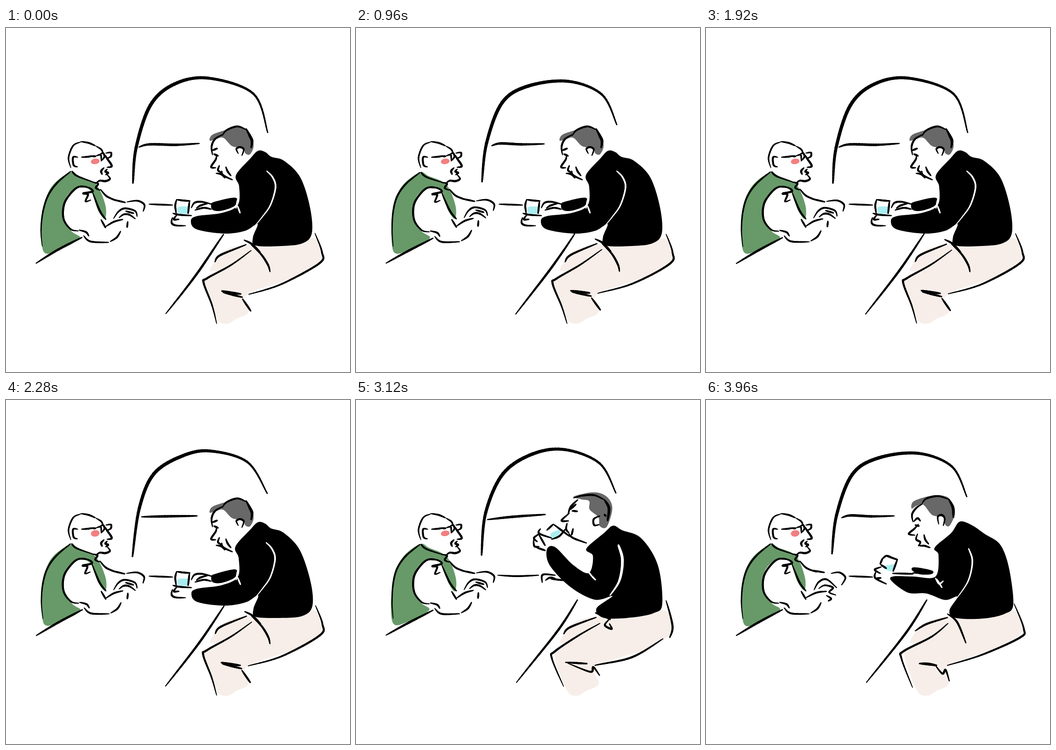
Recreate the animation shown at these times as an HTML page with a canvas. Size 748 by 748 pixels, loop 4080 ms.

```html
<!DOCTYPE html>
<html lang="en">
<head>
<meta charset="utf-8">
<title>Two men at a table</title>
<style>
html, body { margin: 0; width: 100%; height: 100%; overflow: hidden; background: #fff; }
canvas { display: block; width: 748px; height: 748px; }
</style>
</head>
<body>
<canvas id="stage" width="748" height="748"></canvas>
<script>
const ctx = document.getElementById('stage').getContext('2d');
const STEP = 120, COUNT = 34;
let boil = 0;

// Hand-drawn wobble: a slow wave over the stage, different for each redraw
function wobble(x, y) {
  const a = boil ? 1.3 : 0;
  return [x + a * Math.sin(y / 37 + boil * 2.3), y + a * Math.sin(x / 41 + boil * 4.1)];
}

function curve(text, closed) {
  const v = text.trim().split(' ').map(Number), n = v.length / 2, out = [];
  const at = (i, k) => v[2 * (closed ? (i + n) % n : Math.max(0, Math.min(n - 1, i))) + k];
  const mix = (i, t, k) => {
    const a = at(i - 1, k), b = at(i, k), c = at(i + 1, k), d = at(i + 2, k);
    return b + t / 2 * (c - a + t * (2 * a - 5 * b + 4 * c - d + t * (3 * (b - c) + d - a)));
  };
  for (let i = 0; i < (closed ? n : n - 1); i++)
    for (let t = 0; t < 1; t += 0.1) out.push(wobble(mix(i, t, 0), mix(i, t, 1)));
  if (!closed) out.push(wobble(at(n - 1, 0), at(n - 1, 1)));
  return out;
}

function fill(color, text) {
  ctx.fillStyle = color;
  ctx.beginPath();
  curve(text, true).forEach(p => ctx.lineTo(...p));
  ctx.fill();
}

// Tapered brush strokes; peak is where the stroke is fattest
function ink(width, list, color = '#000', peak = 0.5) {
  ctx.strokeStyle = color;
  ctx.lineCap = 'round';
  for (const text of list.split(';')) {
    const p = curve(text);
    for (let i = 1; i < p.length; i++) {
      const u = i / p.length, s = Math.sin(Math.PI * u ** (Math.log(0.5) / Math.log(peak)));
      ctx.lineWidth = width * (0.25 + 0.75 * s ** 0.7);
      ctx.beginPath();
      ctx.moveTo(...p[i - 1]);
      ctx.lineTo(...p[i]);
      ctx.stroke();
    }
  }
}

const arches = {
  A: '276 337 283 260 314 168 366 122 440 109 538 143 569 227',
  B: '274 334 284 250 318 162 375 126 462 116 535 145 567 210',
  C: '273 337 282 245 320 160 385 117 455 108 530 138 565 202',
  D: '275 340 290 235 322 160 385 121 445 111 525 135 568 203'
};
const sills = {
  A: '289 259 312 253 370 254 420 251',
  B: '295 256 314 251 360 253 409 252',
  C: '286 260 340 254 411 249',
  D: '295 254 345 253 415 252'
};

function room(arch, pose) {
  boil = 0;
  ink(7.5, arches[arch], '#000', 0.36);
  ink(5.5, sills[arch]);
  ink(4, pose === 'drink' ? '308 381 350 383 397 381' : '311 383 335 384 362 385');
}

function table(pose, k) {
  boil = k;
  ink(5, '66 512 115 483 166 456');
  ink(5, pose === 'rest' ? '347 622 420 528 474 448' : '349 614 435 506 480 435');
}

function vest(k) {
  boil = k;
  fill('#679a68', '140 314 108 335 90 362 80 405 77 450 83 488 110 485 160 458 142 441 123 403 132 366 158 347 184 354 200 396 215 415 216 385 196 340 158 322');
}

function oldMan(pose, k) {
  boil = 0;
  ink(3.5, '141 304 136 282 146 256 162 248;196 257 207 264 211 272;196 278 206 276 207 288');
  ink(4, '163 247 180 250 194 256;156 281 146 281 147 298 155 302;164 281 178 280 190 278;204 275 211 272 214 280 207 289;217 272 228 271 228 279 221 283');
  ink(4.5, '189 279 194 279;214 275 220 284 230 300 220 303;213 304 207 311 209 318;220 307 216 312 222 315 217 319;220 319 226 328 216 333 204 332 195 338');
  boil = k;
  ink(4, '143 313 155 323 192 336;140 313 110 338 90 366 80 400 77 440 80 475', '#000', 0.3);
  ink(4.5, '187 352 170 345 150 350 127 380 125 415 141 438 158 442;158 346 178 347 187 355 167 360 177 362 172 377 183 374;187 357 203 396 217 415');
  ink(4, '160 440 175 444 181 452;170 452 185 464 224 465;228 463 242 454 250 441;187 335 199 338 194 347 203 352;204 350 218 365 240 374;207 416 217 433');
  if (pose === 'lift')
    ink(4, '217 430 240 419 262 416;235 413 245 396 262 390 284 408;245 410 258 403 276 408 268 418 282 424;262 425 272 432 266 437;228 370 257 375;272 377 290 375 303 386 295 402');
  else
    ink(4, '217 431 235 420 254 415;234 413 244 398 258 391 280 397 285 409;246 411 256 404 268 405 281 414;260 397 277 402;228 371 258 378;262 377 285 375 300 384 298 398;265 420 264 432');
}

function legFill(k) {
  boil = k;
  const foot = k % 2 ? '515 613 475 634 452 622 ' : '528 617 502 632 480 643 458 630 ';
  fill('#f7eee9', '478 482 525 471 600 474 665 457 687 475 685 507 640 538 525 579 ' + foot + '431 552 455 530 443 527 457 502');
}

const legs = {
  rest: '458 642 447 603 429 555 437 544 490 514 534 483;455 508 467 493 523 470;519 460 536 469 554 487;534 470 556 492 570 515 574 530;673 447 688 487 682 512 600 557 527 578;471 574 512 584;513 588 531 614',
  lift: '449 625 425 562 430 546 490 515 526 486;455 502 480 487 525 473;525 465 546 483 565 528;670 443 691 497 682 517 600 554 525 577;498 576 514 595 521 587 529 611',
  drink: '451 622 427 560 433 546 480 515 530 487;452 508 465 494 521 474;550 478 541 491 556 499 551 488;673 435 688 490 683 515;668 518 600 560 521 578;457 570 503 574;462 572 510 592 517 582 530 600'
};
const folds = { rest: '468 571 484 574 509 577', lift: '464 573 482 574 501 577', drink: '520 464 538 470 552 478' };

const hair = {
  rest: '443 245 449 232 480 221 502 213 524 222 536 244 538 260 530 275 520 272 516 261 492 257 473 239 458 241',
  lift: '447 236 452 220 490 208 515 208 531 217 541 245 530 273 520 271 516 255 492 250 473 228 458 230',
  drink: '473 210 510 201 535 204 552 218 557 240 545 276 530 274 527 255 508 238 507 220 490 216'
};
const faces = {
  rest: '449 276 447 258 454 242 470 232;470 234 480 222 503 214 522 221;449 266 459 262;452 274 461 278;458 277 456 286 446 302 456 304;464 299 461 309 468 314;478 302 482 312 489 321;457 316 468 318 476 326;469 311 472 320 492 330;505 273 501 263 509 259 517 264 513 277',
  lift: '450 265 448 249 457 235 470 226;470 224 480 214 505 209 528 216;452 264 460 257 466 263;455 272 463 274;462 270 453 280 441 291 454 294;460 291 457 303 466 309 462 317;474 293 477 304 484 313;464 317 475 317 487 321;506 270 504 254 513 250 519 258 516 273',
  drink: '461 249 467 232 482 217;473 213 492 208 518 207 540 217;466 238 478 227;470 241 481 242;464 246 447 262 462 263;459 268 457 281 463 289;472 280 469 293;463 291 472 300 501 311;529 271 518 272 517 259 530 252;540 249 543 252'
};
const napes = { rest: '522 219 530 234 535 246 533 260', lift: '528 216 537 234 538 255', drink: '540 217 550 235 547 262' };

const coats = {
  rest: '548 267 530 285 500 320 507 345 504 385 470 402 415 409 402 420 415 438 475 447 520 441 547 426 537 455 543 473 600 474 645 468 665 446 661 390 640 325 605 289 577 280 564 270',
  lift: '550 264 532 289 497 322 506 338 500 385 450 385 408 384 405 394 440 420 480 422 520 435 547 427 529 457 540 473 600 474 648 465 668 445 661 370 640 315 605 290 575 270',
  drink: '560 273 540 288 500 322 514 338 505 375 470 357 432 320 414 326 420 360 465 405 520 433 558 426 524 452 540 473 600 474 650 464 667 443 655 360 620 302 580 284'
};
const sleeves = {
  rest: '446 385 453 378 499 369 498 386 470 397 450 396',
  lift: '449 371 455 365 493 372 490 380 465 380'
};
const seams = {
  rest: '567 311 580 325 586 347 575 385 557 411 538 434',
  lift: '571 322 580 350 571 393 542 435',
  drink: '570 316 578 348 572 393 553 424'
};
const elbows = { rest: '500 392 504 372;503 386 509 402', lift: '500 388 508 400 517 394;503 390 514 408', drink: '504 372 512 382;510 380 520 390' };

const hands = {
  rest: '371 373 368 386 370 402;371 373 384 375 400 376;399 376 396 403;363 403 376 406 403 408;371 407 365 416 376 416;362 412 360 423 368 429 390 430;403 391 410 380 426 378 450 384;414 392 423 386 440 381;411 396 430 391 446 394',
  lift: '384 344 379 356;383 346 392 339 404 342;392 339 416 347;416 347 407 372;380 358 392 366;381 363 367 369 379 377;369 374 368 387 392 400;369 388 380 387;406 377 450 378;450 376 492 376',
  drink: '415 283 428 271;429 270 464 296;425 303 442 296 455 281;401 280 398 290 425 300;400 290 387 300 394 308;386 304 388 318 398 319;398 293 411 316;393 321 411 327;405 397 406 380 433 381;412 392 423 386 436 390;424 389 451 392'
};
const water = {
  rest: '374 390 386 388 397 390 397 402 385 404 374 402',
  lift: '385 362 397 359 409 358 404 372 392 369',
  drink: '424 290 446 282 435 300 426 302'
};

function cheek(k) {
  ctx.fillStyle = '#f37f80';
  ctx.beginPath();
  ctx.ellipse(194, 290, 9.5, 6 + k % 2, -0.15, 0, Math.PI * 2);
  ctx.fill();
}

function youngerMan(pose, k) {
  boil = k;
  if (sleeves[pose]) fill('#000', sleeves[pose]);
  fill('#000', coats[pose]);
  ink(pose === 'drink' ? 6 : 3.5, seams[pose], '#fff', 0.3);
  ink(3.5, elbows[pose], '#fff');
  boil = 0;
  ink(4.2, faces[pose]);
  ink(6, napes[pose]);
  ink(4.2, hands[pose]);
}

function poseAt(i) {
  if (i > 24 && i < 32) return 'drink';
  return i > 22 ? 'lift' : 'rest';
}

const archOrder = 'ADCABDCABCADBCABABADBCDBADCBDCDBDB';

function draw(i) {
  const pose = poseAt(i), k = i * 7 % 4, line = pose === 'lift' ? 0 : (i + 2) % 3;
  ctx.fillStyle = '#fff';
  ctx.fillRect(0, 0, 748, 748);
  vest(k);
  legFill((k + i) % 4);
  boil = 0;
  fill('#686868', hair[pose]);
  fill('#aaeef2', water[pose]);
  cheek(k);
  room(archOrder[i], pose);
  table(pose, line);
  oldMan(pose, line);
  youngerMan(pose, k);
  boil = line;
  ink(4.5, legs[pose]);
  ink(6, folds[pose]);
}

let last = -1;
function tick() {
  const i = Math.floor(performance.now() / STEP) % COUNT;
  if (i !== last) draw(last = i);
  requestAnimationFrame(tick);
}
tick();
</script>
</body>
</html>
```
